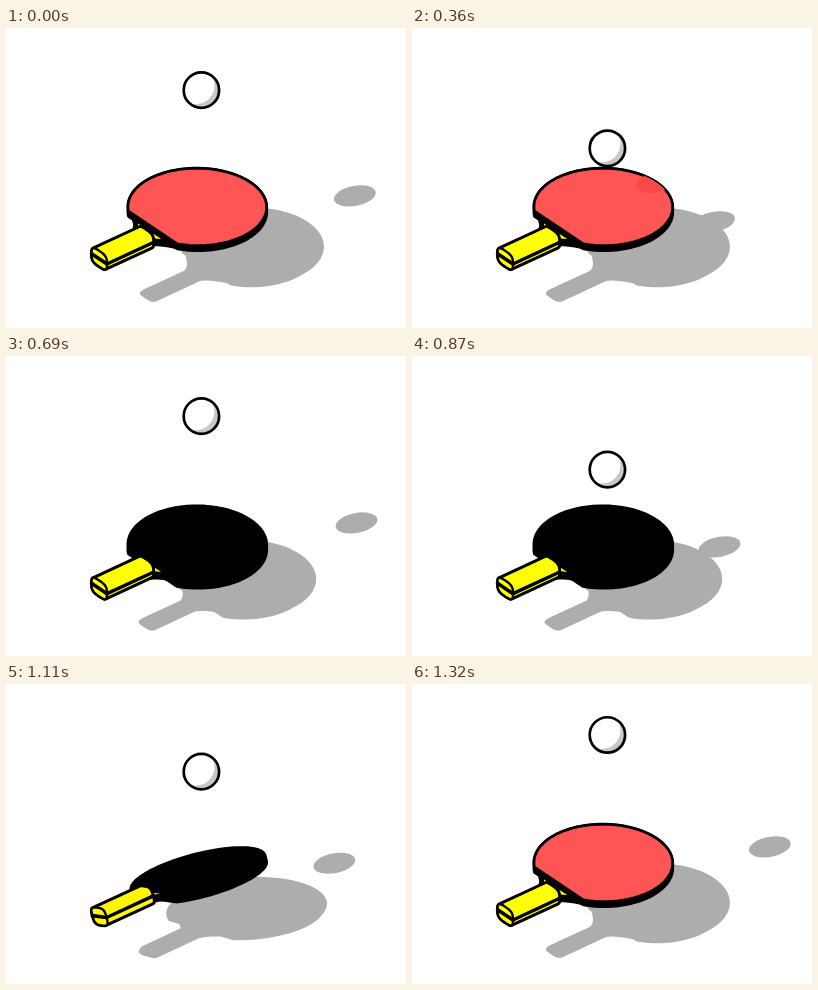
These frames come from a looping animation (400 px wide and 300 px high, 1350 ms). An HTML page:

```html
<!DOCTYPE html>
<html lang="en">
<head>
<meta charset="utf-8">
<title>Paddle and ball</title>
<style>
  html, body { margin: 0; width: 100%; height: 100%; overflow: hidden; background: #fff; }
  svg { display: block; width: 100vw; height: 100vh; }
</style>
</head>
<body>
<svg viewBox="0 0 400 300">
  <defs>
    <clipPath id="faceClip"><path id="facePath"/></clipPath>
    <clipPath id="ballClip"><circle r="17"/></clipPath>
  </defs>
  <g fill="#adadad">
    <ellipse id="ballShadow" rx="21.2" ry="10"/>
    <path id="shadow"/>
  </g>
  <g stroke="#000" stroke-width="3" stroke-linejoin="round" stroke-linecap="round">
    <path id="blade"/>
    <path id="neck"/>
    <path id="face" stroke-width="2.6"/>
    <path id="wood" stroke="none"/>
    <path id="grip"/>
    <path id="band" fill="none" stroke-width="3.4"/>
    <path id="cap" stroke-width="2.4"/>
    <path id="slot" stroke-width="3.6" fill="none"/>
  </g>
  <g clip-path="url(#faceClip)"><ellipse id="spot" rx="21.2" ry="10" fill="#f94848"/></g>
  <g id="ball">
    <circle r="17.7" fill="#c8c8c8"/>
    <g clip-path="url(#ballClip)"><circle cx="-5.5" cy="-4.5" r="18.5" fill="#fff"/></g>
    <circle r="17.7" fill="none" stroke="#000" stroke-width="2.7"/>
  </g>
</svg>
<script>
const LOOP = 1350, STEP = 30;
const GRAVITY = 9.4e-4;
const R = 69.3, CUT = -58;          // blade radius and straight edge
const BACK = 2.8, FRONT = 8.8;      // blade faces, measured from the spin axis
const AXIS_H = 64, GROUND_Y = 253;
const GRIP_END = -128, GRIP_TOP = -67, GRIP_W = 12, GRIP_H = 9.6;
const LIGHT = { x: 0.804, y: 0.554 };

const el = {};
document.querySelectorAll('svg [id]').forEach(e => { el[e.id] = e; });
const range = (n, f) => Array.from({ length: n }, (_, i) => f(i));
const smooth = x => { x = Math.min(1, Math.max(0, x)); return x * x * (3 - 2 * x); };
const path = pts => 'M' + pts.map(p => p[0].toFixed(2) + ' ' + p[1].toFixed(2)).join('L');
const closed = pts => path(pts) + 'Z';
const set = (id, d, fill) => {
  el[id].setAttribute('d', d);
  if (fill) el[id].setAttribute('fill', fill);
};

// Paddle parts as [along, across] points
const cutAngle = Math.acos(CUT / R);
const bladeShape = range(61, i => {
  const q = cutAngle * (i / 30 - 1);
  return [R * Math.cos(q), R * Math.sin(q)];
});
function neckShape(from, inset) {
  const side = range(9, i => {
    const s = from + (1 - from) * i / 8;
    return [CUT + 5 - 27 * s, 11 + 28 * (1 - s) ** 2 - inset];
  });
  return side.concat(side.map(([a, b]) => [a, -b]).reverse());
}
const neckOuter = neckShape(0, 0), neckInner = neckShape(0.25, 5);
const soft = v => Math.sign(v) * Math.abs(v) ** 0.6;
const section = range(32, i => {
  const q = i * Math.PI / 16;
  return [GRIP_W * soft(Math.cos(q)), 1 + GRIP_H * soft(Math.sin(q))];
});

function hull(points) {
  const pts = points.slice().sort((p, q) => p[0] - q[0] || p[1] - q[1]);
  const chain = list => {
    const out = [];
    for (const p of list) {
      while (out.length > 1) {
        const [u, v] = out.slice(-2);
        if ((v[0] - u[0]) * (p[1] - u[1]) - (v[1] - u[1]) * (p[0] - u[0]) > 0) break;
        out.pop();
      }
      out.push(p);
    }
    out.pop();
    return out;
  };
  return chain(pts).concat(chain(pts.reverse()));
}

// Gives every outline the same winding, so that overlaps stay filled
function wind(pts) {
  const area = pts.reduce((sum, p, i) => {
    const q = pts[(i + 1) % pts.length];
    return sum + p[0] * q[1] - p[1] * q[0];
  }, 0);
  return area < 0 ? pts.slice().reverse() : pts;
}

// Projects a paddle point; the third value is its height on screen
function projector(angle) {
  const c = Math.cos(angle), s = Math.sin(angle);
  return (a, b, n) => {
    const w = b * c + n * s, z = 0.828 * (n * c - b * s);
    return [191.3 + 0.766 * a + 0.643 * w, 186.2 - 0.355 * a + 0.43 * w - z, AXIS_H + z];
  };
}
const cast = ([x, y, h]) => [x + LIGHT.x * h, y + LIGHT.y * h];

function ballY(t) {
  const [peak, top] = t < 282 ? [-52, 59.6] : t < 961 ? [622, 55.8] : [1308, 50.8];
  return top + GRAVITY * (t - peak) ** 2;
}

function drawPaddle(angle) {
  const c = Math.cos(angle), s = Math.sin(angle);
  const at = projector(angle);
  const flat = (shape, n) => shape.map(([a, b]) => at(a, b, n));
  const ring = a => section.map(([b, n]) => at(a, b, n));
  const redUp = 0.56 * c + 0.634 * s > 0;
  const side = 0.634 * c - 0.56 * s > 0 ? 1 : -1;
  const yellow = `rgb(255,${Math.round(255 - 24 * s)},0)`;
  const tint = Math.round(85 - 17 * s);

  const front = flat(bladeShape, FRONT);
  const disc = front.concat(flat(bladeShape, BACK));
  const slices = [1, 2.5, 4, 5.5].map(n => flat(neckOuter, n));
  const cap = ring(GRIP_END);
  const grip = cap.concat(ring(GRIP_TOP));

  set('blade', closed(hull(disc)));
  set('neck', slices.map(closed).join(''));
  set('face', closed(front), `rgb(255,${tint},${tint})`);
  el.face.style.display = redUp ? '' : 'none';
  set('wood', closed(flat(neckInner.filter(([a]) => a < CUT - 3), redUp ? 6 : 0)), yellow);
  set('grip', closed(hull(grip)), yellow);
  set('band', path([at(GRIP_END, GRIP_W * side, 1), at(GRIP_TOP, GRIP_W * side, 1)]));
  set('cap', closed(cap), yellow);
  set('slot', path([at(GRIP_END, -GRIP_W, 1), at(GRIP_END, GRIP_W, 1)]));
  set('facePath', closed(front));

  const parts = [hull(disc.map(cast)), hull(grip.map(cast)), ...slices.map(p => p.map(cast))];
  set('shadow', parts.map(p => closed(wind(p))).join(''));
}

function drawBall(y, lying) {
  const place = (id, h) => el[id].setAttribute('transform',
    `translate(${195.4 + LIGHT.x * h} ${y + LIGHT.y * h}) rotate(-11)`);
  el.ball.setAttribute('transform', `translate(195.4 ${y})`);
  place('ballShadow', GROUND_Y - y);
  place('spot', GROUND_Y - AXIS_H - 0.828 * FRONT - y);
  el.spot.style.display = lying ? '' : 'none';
}

function draw(t) {
  const turn = smooth((t - 413) / 270) - smooth((t - 1050) / 270);
  drawPaddle(Math.PI * turn);
  drawBall(ballY(t), turn < 0.02);
}

const start = performance.now();
function tick() {
  const t = (performance.now() - start) % LOOP;
  draw(Math.floor(t / STEP) * STEP);
  requestAnimationFrame(tick);
}
tick();
</script>
</body>
</html>
```
